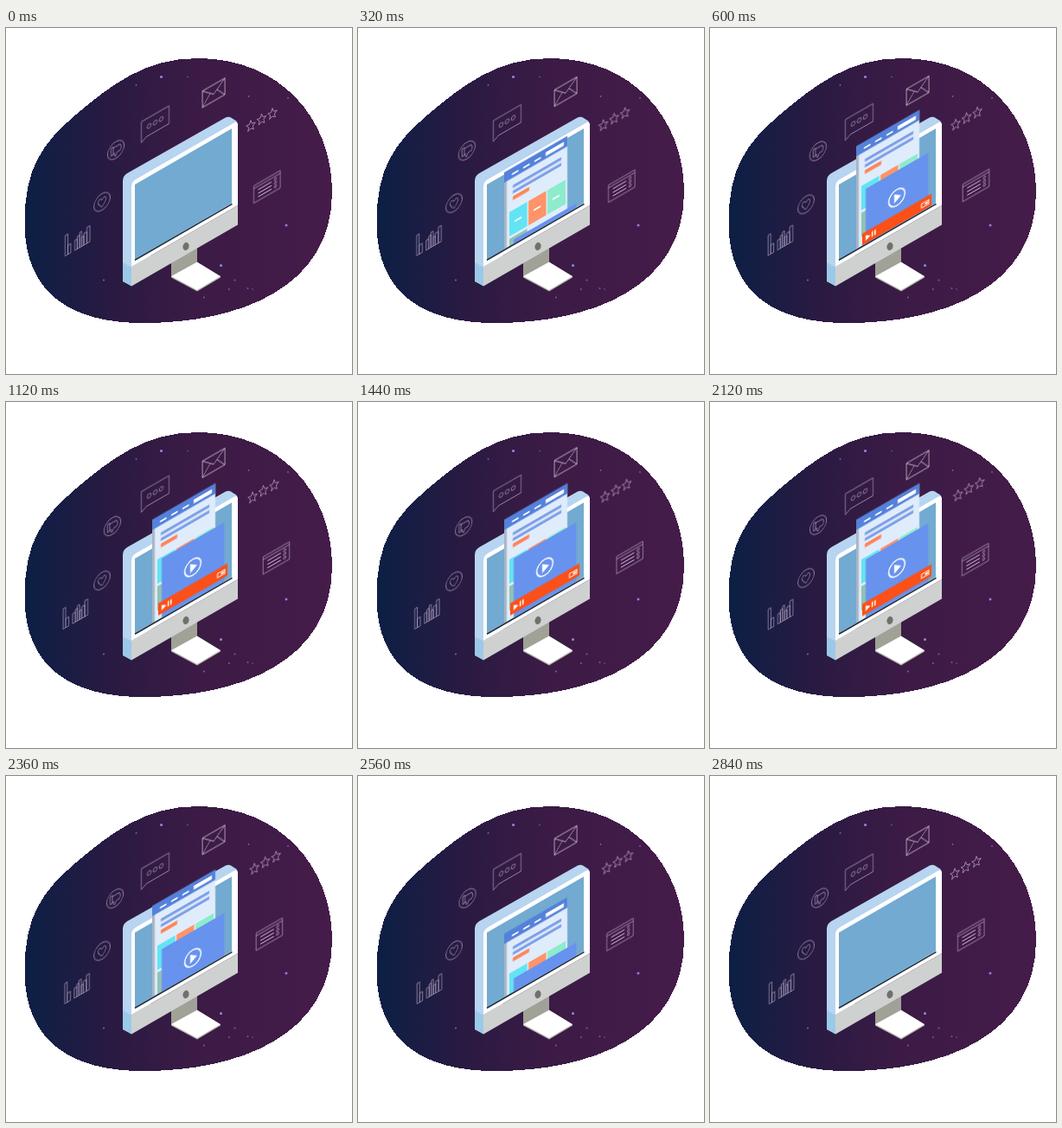
An HTML page for the animation above (2920 ms loop, 400 by 400 pixels).

```html
<!DOCTYPE html>
<html lang="en">
<head>
<meta charset="utf-8">
<title>Isometric desktop</title>
<style>
  html, body { margin: 0; width: 100%; height: 100%; overflow: hidden; background: #fff; }
  svg { display: block; width: 100%; height: 100%; }

  .icon { animation: drift 2920ms linear infinite; }
  .stars { animation: climb 2920ms linear infinite; }
  .page { animation: page 2920ms infinite; }
  .player { animation: player 2920ms linear infinite; }

  .lines { fill: none; stroke: #cdbbd6; stroke-width: .6; stroke-linejoin: round; }

  @keyframes drift {
    0% { transform: translate(0, 0); }
    46.58% { transform: translate(var(--x), var(--y)); animation-timing-function: cubic-bezier(.3, .25, .6, .9); }
    97.26%, 100% { transform: translate(0, 0); }
  }
  @keyframes climb {
    0% { transform: translate(0, 0); }
    97.25% { transform: translate(5px, -7px); }
    97.26%, 100% { transform: translate(0, 0); }
  }
  @keyframes page {
    0% { transform: translateY(122px); animation-timing-function: cubic-bezier(.333, .667, .667, 1); }
    22.1% { transform: translateY(0); }
    72.4% { transform: translateY(0); animation-timing-function: cubic-bezier(.333, 0, .667, .333); }
    97.26%, 100% { transform: translateY(122px); }
  }
  @keyframes player {
    0%, 9.76% { transform: translateY(71px); }
    20.55% { transform: translateY(5px); animation-timing-function: ease-out; }
    30.8% { transform: translateY(0); }
    70.5% { transform: translateY(0); animation-timing-function: cubic-bezier(.333, 0, .667, .333); }
    90.4%, 100% { transform: translateY(71px); }
  }
</style>
</head>
<body>
<svg viewBox="0 0 400 400">
  <defs>
    <linearGradient id="night">
      <stop offset="0" stop-color="#0c1f45"/>
      <stop offset=".28" stop-color="#291a42"/>
      <stop offset=".55" stop-color="#3b1b45"/>
      <stop offset="1" stop-color="#451c49"/>
    </linearGradient>
    <clipPath id="aboveSill"><path d="M100 0H300V179.9L100 295.3Z"/></clipPath>
    <path id="star" d="M0-6.300 1.500-2 5.300-1.900 2.400 1 3.300 5.300 0 2.900-3.300 5.300-2.400 1-5.300-1.900-1.500-2Z"/>
  </defs>

  <path fill="url(#night)" shape-rendering="crispEdges" d="M21.500 225C21.500 163 41 134 81 100C121 66.500 160 35 222 35C316 35 377 104 377 190C377 300 270 341 158 341C78 341 21.500 309 21.500 225Z"/>

  <g fill="#7d5cb0">
    <circle cx="179.500" cy="56.500" r="1.600" fill="#a57be0"/>
    <circle cx="324" cy="228" r="1.500" fill="#9a78dc"/>
    <circle cx="248.500" cy="274.500" r="1.500" fill="#8c8ed6"/>
    <circle cx="150.500" cy="66" r=".9"/>
    <circle cx="210" cy="56.500" r=".8"/>
    <circle cx="280.500" cy="79" r=".9"/>
    <circle cx="326" cy="81" r=".9"/>
    <circle cx="113" cy="291.500" r="1.100"/>
    <circle cx="264.500" cy="291.500" r="1"/>
    <circle cx="258" cy="302" r=".9"/>
    <circle cx="279.500" cy="301" r=".9"/>
    <circle cx="285" cy="302" r=".8"/>
    <circle cx="229" cy="311.500" r="1"/>
  </g>

  <g class="lines">
    <g class="icon" style="--x:-3px;--y:-1px">
      <g transform="matrix(1 -.577 0 1 68.500 240)">
        <path d="M0 0H3V23.500H0ZM3 13H6.500V23.500H3ZM11 12H14V23.500H11ZM14 9H16.500V23.500H14ZM16.500 6H19V23.500H16.500ZM19 13H21.500V23.500H19ZM21.500 10H25V23.500H21.500ZM25 5H28.500V23.500H25Z"/>
      </g>
    </g>
    <g class="icon" style="--x:0px;--y:6.500px">
      <g transform="matrix(1 -.577 0 1 111 201)">
        <circle r="9.500"/>
        <path d="M0 6C-2.500 3-4.500 1-4.500-1.500C-4.500-5-1-5 0-2C1-5 4.500-5 4.500-1.500C4.500 1 2.500 3 0 6Z"/>
      </g>
    </g>
    <g class="icon" style="--x:-5px;--y:3px">
      <g transform="matrix(1 -.577 0 1 127 141)">
        <circle r="9.700"/>
        <path d="M-5.500-5H-3V4H-5.500ZM-3-4H5L6.500 0 5 3H1.500L0 7Q-2 7-1.500 3H-3"/>
      </g>
    </g>
    <g class="icon" style="--x:0px;--y:-6px">
      <g transform="matrix(1 -.577 0 1 156.500 108.500)">
        <path d="M0 0H32V20.500H6L0 24Z"/>
        <circle cx="9" cy="10" r="2.300"/>
        <circle cx="16" cy="10" r="2.300"/>
        <circle cx="23" cy="10" r="2.300"/>
      </g>
    </g>
    <g class="icon" style="--x:0px;--y:-5.500px" stroke="#e6dcec" stroke-width=".7">
      <g transform="matrix(1 -.577 0 1 227 73)">
        <path d="M0 0H26V19H0ZL13 11 26 0M0 19 9 8M26 19 17 8"/>
      </g>
    </g>
    <g class="stars">
      <use href="#star" transform="matrix(1 -.4 0 1 283 113)"/>
      <use href="#star" transform="matrix(1 -.4 0 1 295.500 105.500)"/>
      <use href="#star" transform="matrix(1 -.4 0 1 308 99)"/>
    </g>
    <g class="icon" style="--x:13px;--y:-4px">
      <g transform="matrix(1 -.577 0 1 286.500 182.500)">
        <path d="M0 0H30.500V20H0ZM0 3.200H30.500"/>
        <path stroke-width="1" d="M5 7.200H20.500M5 11.400H20.500M5 15.600H20.500"/>
        <circle cx="25" cy="6.500" r="1.400"/>
        <circle cx="25" cy="10.800" r="1.400"/>
        <circle cx="25" cy="15.100" r="1.400"/>
      </g>
    </g>
  </g>

  <!-- stand -->
  <path fill="#a0a197" d="M191 265 221 248V273L191 288Z"/>
  <path fill="#b4b5ae" d="M191 287V288.500L221 304.500 248 288.500V287Z"/>
  <path fill="#fff" d="M191 287 221 270.500 248 287 221 303Z"/>

  <!-- monitor -->
  <path fill="#b7d4f0" d="M135 293V177Q135 171 140 168L253 104Q257 102 260 103.500L267 108 150 290 145 298Z"/>
  <path fill="#9bc9e8" d="M135 271 145 276.500V298.500L135 292.500Z"/>
  <g transform="matrix(1 -.577 0 1 145 178)">
    <path fill="#fff" d="M0 98V6Q0 0 5 0H118Q123 0 123 5V98Z"/>
    <path fill="#cfd0d0" d="M0 98H123V120.500H0Z"/>
    <path fill="#73aad1" d="M4 5.200H116V91.500H4Z"/>
  </g>
  <ellipse cx="208" cy="252.500" rx="3.500" ry="4.700" fill="#70706c" transform="rotate(15 208 252.500)"/>

  <g clip-path="url(#aboveSill)">
    <g class="page">
      <g transform="matrix(1 -.577 0 1 170 136)">
        <path fill="#dfecfb" d="M0 0H72V125H0Z"/>
        <path fill="#a9b4c4" d="M-1 0H2V125H-1Z"/>
        <path fill="#5481da" d="M-1-.500H72V11.500H-1Z"/>
        <path fill="#fff" d="M8 6H15.500V8H8ZM21 6H28.500V8H21ZM34 6H41.500V8H34ZM47 4H68V8.500H47Z"/>
        <path fill="#7f9fe8" d="M9 20H65V23.500H9ZM9 26.500H65V30H9Z"/>
        <path fill="#ff8558" d="M9 33H28V37.500H9Z"/>
        <path fill="#62e4f4" d="M5 49H25.500V77H5Z"/>
        <path fill="#ff9468" d="M27 49H47.500V77H27Z"/>
        <path fill="#8ceccb" d="M49 49H70V77H49Z"/>
        <path fill="#fff" d="M11 62H19V64H11ZM33 62H41V64H33ZM55 62H63V64H55Z"/>
        <path fill="#92c2b4" d="M5 80H25.500V108H5Z"/>
      </g>
    </g>
    <g class="player">
      <g transform="matrix(1 -.577 0 1 180 181)">
        <path fill="#6792ee" d="M0 0H72.500V90H0Z"/>
        <path fill="#fb5017" d="M-4 49.500H76V63.500H-4Z"/>
        <circle cx="36" cy="30.800" r="9.300" fill="none" stroke="#fff" stroke-width="1.500"/>
        <path fill="#fff" d="M33 25.500 41 31 33 36ZM0 53.500 5.500 57 0 60ZM7 53.500H8.500V59.500H7ZM10 53.500H11.500V59.500H10Z"/>
        <path fill="none" stroke="#fff" d="M64.500 54.800H73V59.200H64.500Z"/>
        <path fill="#fff" d="M68.500 56H72V58H68.500Z"/>
      </g>
    </g>
  </g>
  <path stroke="#1d2c3c" stroke-width="1.600" d="M149 268.200 261.500 203.400"/>
</svg>
</body>
</html>
```
